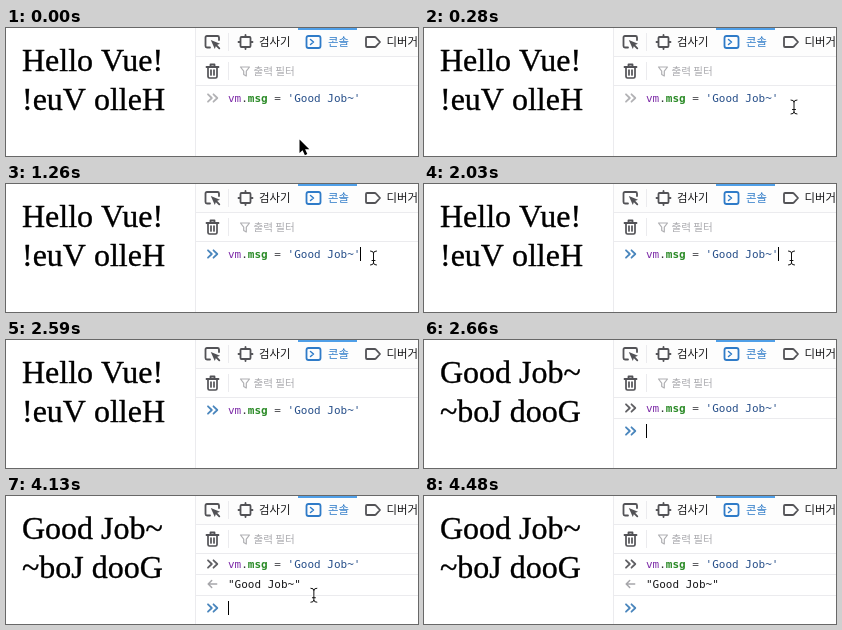
An HTML page with a canvas that plays this animation: 412 px wide and 128 px high, repeating every 4.69 s.

```html
<!DOCTYPE html>
<html lang="ko">
<head>
<meta charset="utf-8">
<title>Console demo</title>
<style>
html, body { margin: 0; width: 100%; height: 100%; overflow: hidden; background: #fff; }
canvas { display: block; width: 412px; height: 128px; }
</style>
</head>
<body>
<canvas id="stage"></canvas>
<script>
const W = 412, H = 128, LOOP = 4690, STEP = 70, BLINK = 560;
const SERIF = '32px "Liberation Serif", serif';
const MONO = '11px "DejaVu Sans Mono", monospace';
const KOREAN = '"Noto Sans CJK KR", "Noto Sans CJK", sans-serif';
const GREY = '#525256', BLUE = '#2f7bc8', RULE = '#ebebee', PROMPT = '#4a86bd';

const canvas = document.getElementById('stage');
const dpr = window.devicePixelRatio || 1;
canvas.width = W * dpr;
canvas.height = H * dpr;
const ctx = canvas.getContext('2d');
ctx.scale(dpr, dpr);

function text(str, x, y, font, color) {
  ctx.font = font;
  ctx.fillStyle = color;
  ctx.fillText(str, x, y);
}

function rect(x, y, w, h, color) {
  ctx.fillStyle = color;
  ctx.fillRect(x, y, w, h);
}

function stroke(d, color, width = 1.8) {
  ctx.strokeStyle = color;
  ctx.lineWidth = width;
  ctx.lineCap = ctx.lineJoin = 'round';
  ctx.stroke(new Path2D(d));
}

const smooth = u => u * u * (3 - 2 * u);
const clamp = u => Math.max(0, Math.min(1, u));
const mix = (a, b, u) => a + (b - a) * u;

// slightly emboldened headline
function headline(str, y) {
  text(str, 16, y, SERIF, '#000');
  ctx.strokeStyle = '#000';
  ctx.lineWidth = 0.35;
  ctx.strokeText(str, 16, y);
}

function page(changed) {
  const msg = changed ? 'Good Job~' : 'Hello Vue!';
  headline(msg, 43);
  headline([...msg].reverse().join(''), 82);
}

function toolbar() {
  rect(189, 0, 1, H, RULE);
  rect(190, 0, 222, 28, '#fdfdfd');
  rect(190, 28, 222, 1, RULE);
  rect(190, 57, 222, 1, RULE);
  rect(222, 5, 1, 18, RULE);
  rect(222, 34, 1, 18, RULE);
  rect(292, 0, 59, 2, '#4f9fe8');

  // element picker
  stroke('M204 19.5H201Q199.5 19.5 199.5 18V9.5Q199.5 8 201 8H211.5Q213 8 213 9.5V12', GREY);
  ctx.fillStyle = GREY;
  ctx.fill(new Path2D('M204.8 12L214 15.8L210.2 17.2L208.8 21Z'));
  stroke('M210 17L213.3 20.3', GREY);

  // inspector
  stroke('M235.5 9H243.5Q244.5 9 244.5 10V18Q244.5 19 243.5 19H235.5Q234.5 19 234.5 18V10Q234.5 9 235.5 9Z', GREY);
  stroke('M239.5 7V8 M239.5 20V21 M232.5 14H233.5 M245.5 14H246.5', GREY);

  // console
  stroke('M302.5 8H312.5Q314.5 8 314.5 10V18Q314.5 20 312.5 20H302.5Q300.5 20 300.5 18V10Q300.5 8 302.5 8Z', BLUE);
  stroke('M304.5 11.5L307.5 14L304.5 16.5', BLUE, 1.5);

  // debugger
  stroke('M361 9H368.5Q369.5 9 370 9.6L374 14L370 18.4Q369.5 19 368.5 19H361Q360 19 360 18V10Q360 9 361 9Z', GREY);

  const tab = '11.4px ' + KOREAN;
  text('검사기', 253, 17.5, tab, '#18181a');
  text('콘솔', 322, 17.5, tab, BLUE);
  text('디버거', 380.6, 17.5, tab, '#18181a');

  // trash and filter
  stroke('M200.5 39H212.5 M204.5 38.5V36.5H208.5V38.5', GREY);
  stroke('M202 39.5V48.5Q202 50 203.5 50H209.5Q211 50 211 48.5V39.5 M205 42V47 M208 42V47', GREY, 1.7);
  stroke('M234.5 39H243.5L240.3 43.2V48L237.7 46.5V43.2Z', '#b0b0b3', 1.2);
  text('출력 필터', 247.5, 47, '10.6px ' + KOREAN, '#acacb0');
}

function prompt(y, color) {
  stroke(`M202 ${y - 3.7}l3.8 3.7l-3.8 3.7 M207.5 ${y - 3.7}l3.8 3.7l-3.8 3.7`, color);
}

function command(y) {
  const parts = [['vm', '#7d2ba8'], ['.', '#38383d'], ['msg', '#2a8a26', 'bold '],
                 [' = ', '#4a4a4f'], ["'Good Job~'", '#28508a']];
  let x = 222;
  for (const [str, color, weight = ''] of parts) {
    text(str, x, y, weight + MONO, color);
    x += ctx.measureText(str).width;
  }
}

const caret = (x, y) => rect(x, y, 1, 14, '#000');

function output(t) {
  if (t < 2660) {
    prompt(70, t < 1260 ? '#b2b2b5' : PROMPT);
    command(74);
    if (t >= 1260 && t < 1470 || t >= 2030 && t < 2590) caret(354, 63);
    return;
  }
  const done = t >= 2730, y = done ? 112 : 91;
  prompt(68, '#606064');
  command(72);
  rect(190, 78, 222, 1, RULE);
  if (done) {
    stroke('M202.3 88H210.7 M205.7 84.5L202.2 88L205.7 91.5', '#a6a6aa', 1.5);
    text('"Good Job~"', 222, 92, MONO, '#18181a');
    rect(190, 99, 222, 1, RULE);
  }
  prompt(y, PROMPT);
  if (Math.floor((t - 2660) / BLINK) % 2 === 0) caret(222, y - 7);
}

function arrow(x, y) {
  const shape = new Path2D(`M${x} ${y}v13.5l3.1 -2.8l2.3 5l2.4 -1.1l-2.2 -4.8h4.2Z`);
  ctx.lineJoin = 'miter';
  ctx.strokeStyle = '#fff';
  ctx.lineWidth = 1.6;
  ctx.stroke(shape);
  ctx.fillStyle = '#000';
  ctx.fill(shape);
}

function beam(x, y) {
  const d = `M${x - 3} ${y - 7}q3 0 3 2.2q0 -2.2 3 -2.2 M${x} ${y - 5}v10`
    + ` M${x - 3} ${y + 7}q3 0 3 -2.2q0 2.2 3 2.2 M${x - 1.5} ${y + 2.5}h3`;
  stroke(d, '#fff', 2.6);
  stroke(d, '#111', 1);
}

function ring(t) {
  if (t < 420 || t >= 630) return;
  const u = (t - 420) / 140;
  ctx.globalAlpha = u > 0.5 ? 0.5 : 1;
  ctx.strokeStyle = '#000';
  ctx.lineWidth = 3;
  ctx.beginPath();
  ctx.arc(370, 79, mix(10.8, 20.4, u), 0, Math.PI * 2);
  ctx.stroke();
  ctx.globalAlpha = 1;
}

function pointer(t) {
  if (t < 630) {
    const u = smooth(clamp(t / 280));
    const x = mix(293.5, 370, u), y = mix(111.5, 79, u);
    (u < 1 ? arrow : beam)(x, y);
  } else if (t < 2590) {
    beam(367.5, 74);
  } else if (t >= 3920 && t < 4480) {
    const u = smooth((t - 3920) / 490);
    const x = mix(367.5, 216, u), y = mix(83.5, 123.5, u);
    (y > 120 ? arrow : beam)(x, y);
  }
}

const start = performance.now();

function draw() {
  const now = (performance.now() - start) % LOOP;
  const t = Math.floor(now / STEP) * STEP;
  rect(0, 0, W, H, '#fff');
  page(t >= 2660);
  toolbar();
  output(t);
  ring(t);
  pointer(t);
  requestAnimationFrame(draw);
}
draw();
</script>
</body>
</html>
```
